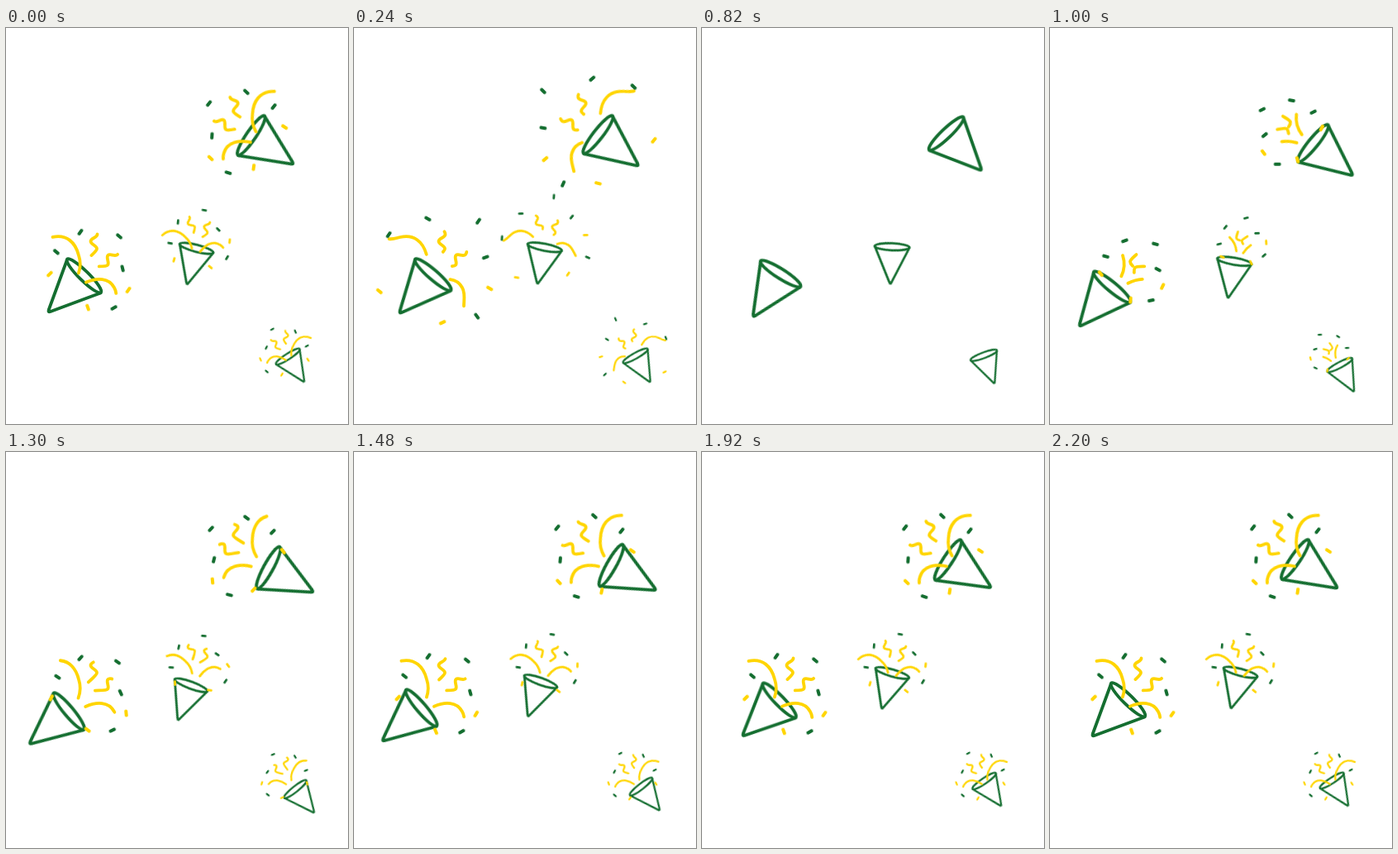
Animation, 414 px wide and 479 px high, one loop 2220 ms. Source, as an HTML page:

```html
<!DOCTYPE html>
<html lang="en">
<head>
<meta charset="utf-8">
<title>Party poppers</title>
<style>
/* Progress values, each 0 to 1, shared by all parts */
@property --grow { syntax: '<number>'; inherits: true; initial-value: 1; }
@property --fly { syntax: '<number>'; inherits: true; initial-value: 0; }
@property --head { syntax: '<number>'; inherits: true; initial-value: 0; }
@property --tail { syntax: '<number>'; inherits: true; initial-value: 0; }

html, body { margin: 0; width: 100%; height: 100%; overflow: hidden; background: #fff; }
svg {
  display: block; width: 414px; height: 479px;
  animation: grow 2220ms infinite, fly 2220ms infinite, head 2220ms infinite, tail 2220ms infinite;
}
g { fill: none; stroke-width: 3.8; stroke-linecap: round; stroke-linejoin: round; }
.green { stroke: #146e30; }
.gold { stroke: #ffd500; }

.recoil { animation: recoil 2220ms infinite; }
.tilt { transform-origin: 74px 280px; animation: tilt 2220ms infinite cubic-bezier(.333, 0, .667, 1); }

/* The visible span of a streamer runs from --from to --to, in percent of its path */
.streamer {
  --from: calc(var(--start) * var(--grow) * var(--grow) + (100 - var(--start)) * var(--tail));
  --to: calc(var(--end) * var(--grow) + (100 - var(--end)) * var(--head));
  stroke-dasharray: calc((var(--to) - var(--from)) * 1px) 300px;
  stroke-dashoffset: calc(var(--from) * -1px);
}
.squiggle { --start: 29; --end: 82; animation: slow-tail 2220ms infinite; }

/* Bits burst from the cone mouth at 92,296, then drift off by --dx,--dy */
.bit {
  --back: calc(.34 * (1 - var(--grow)));
  translate:
    calc((var(--x) + var(--dx) * var(--fly) + (92 - var(--x)) * var(--back)) * 1px)
    calc((var(--y) + var(--dy) * var(--fly) + (296 - var(--y)) * var(--back)) * 1px);
  rotate: calc((var(--turn) * var(--grow) + 125 * var(--fly)) * 1deg);
  animation: fade 2220ms infinite linear;
}

@keyframes recoil {
  0%, 36.04% { transform: none; animation-timing-function: cubic-bezier(.25, .3, .5, 1); }
  45.05% { transform: translate(-21px, 15.3px); animation-timing-function: cubic-bezier(.333, 0, .667, 1); }
  90.09%, 100% { transform: none; }
}
@keyframes tilt {
  0% { transform: rotate(0deg); }
  31.53%, 33.78% { transform: rotate(-13deg); }
  58.56% { transform: rotate(5.7deg); }
  100% { transform: rotate(0deg); }
}
@keyframes grow {
  0%, 38.28% { --grow: 1; }
  38.29% { --grow: 0; animation-timing-function: cubic-bezier(.333, .667, .667, 1); }
  70.27%, 100% { --grow: 1; }
}
@keyframes fly {
  0% { --fly: 0; animation-timing-function: cubic-bezier(.333, .667, .667, 1); }
  25.23%, 38.28% { --fly: 1; }
  38.29%, 100% { --fly: 0; }
}
@keyframes head {
  0% { --head: 0; animation-timing-function: cubic-bezier(.33, .04, .67, .42); }
  24.3%, 38.28% { --head: 1.1; }
  38.29%, 100% { --head: 0; }
}
@keyframes tail {
  0% { --tail: 0; animation-timing-function: cubic-bezier(.33, .04, .67, .42); }
  28.6%, 38.28% { --tail: 1.05; }
  38.29%, 100% { --tail: 0; }
}
@keyframes slow-tail {
  0% { --tail: 0; animation-timing-function: cubic-bezier(.33, .04, .67, .42); }
  36.5%, 38.28% { --tail: 1.05; }
  38.29%, 100% { --tail: 0; }
}
@keyframes fade {
  0%, 20.72% { opacity: 1; }
  25.23% { opacity: var(--late); }
  31.53%, 38.28% { opacity: 0; }
  38.29%, 100% { opacity: 1; }
}
</style>
</head>
<body>
<svg id="stage" viewBox="0 0 414 479"></svg>
<script>
const squiggle = `<path class="gold streamer squiggle" pathLength="100"
  d="M102 290C100 287 97 286 97 282.5S110 271 110 267S102.5 262 102.5 258S110.5 254 110.5 249.5S105 243 102 242"/>`;

const cone = `<g class="recoil"><g class="green tilt">
  <path d="M73.5 281.5L51.7 341Q50.7 344.2 53.8 343L114.5 320.5"/>
  <ellipse rx="28.8" ry="5.8" transform="translate(94.5 299.8) rotate(44.5)"/>
</g></g>`;

const streamers = `
  <path class="gold streamer" pathLength="100" style="--start:4;--end:57"
    d="M86 301C90 293 91 284 88 275C84 259 73 249 56 253C50 254.5 46 256 42 255C34 253 29 246 32 239C34 233 39 230 45 231"/>
  <path class="gold streamer" pathLength="100" style="--start:3;--end:46"
    d="M94 309C108 302 124 301 131 314C135 321 133 330 133 336C132 347 118 352 112 346C108 341 110 336 114 334"/>
  ${squiggle}
  <g transform="translate(135 274) rotate(41.5) translate(-110.5 -249.5)">${squiggle}</g>`;

// Colour, resting place, drift, resting angle; the first ones fade earliest
const bits = [
  ['gold', 53, 297.5, -33, 31, 135],
  ['gold', 148, 317, 24, -3, 305],
  ['green', 141, 291, 27, -20, 75],
  ['green', 130.5, 338.5, 27, 15, -30],
  ['gold', 99, 338, 12, 27, 250],
  ['green', 61, 271, -28, -31, 40],
  ['green', 137, 252, 20, -27, 40],
  ['green', 90, 247, -1, -24, -55]
].map(([colour, x, y, dx, dy, turn], i) =>
  `<path class="${colour} bit" d="M-2.6 0h5.2"
    style="--x:${x};--y:${y};--dx:${dx};--dy:${dy};--turn:${turn};--late:${Math.min(1, i * .22)}"/>`
).join('');

const popper = (x, y, turn, size, flip = 1) =>
  `<g transform="translate(${x} ${y}) rotate(${turn}) scale(${size * flip} ${size}) translate(-107.4 -294)">
    ${cone}${streamers}${bits}
  </g>`;

document.getElementById('stage').innerHTML =
  popper(107.4, 294, 0, 1) +
  popper(283, 126.9, -11.3, 1, -1) +
  popper(236.6, 258.1, -30, .733) +
  popper(334.4, 392.5, 11.8, .593, -1);
</script>
</body>
</html>
```
